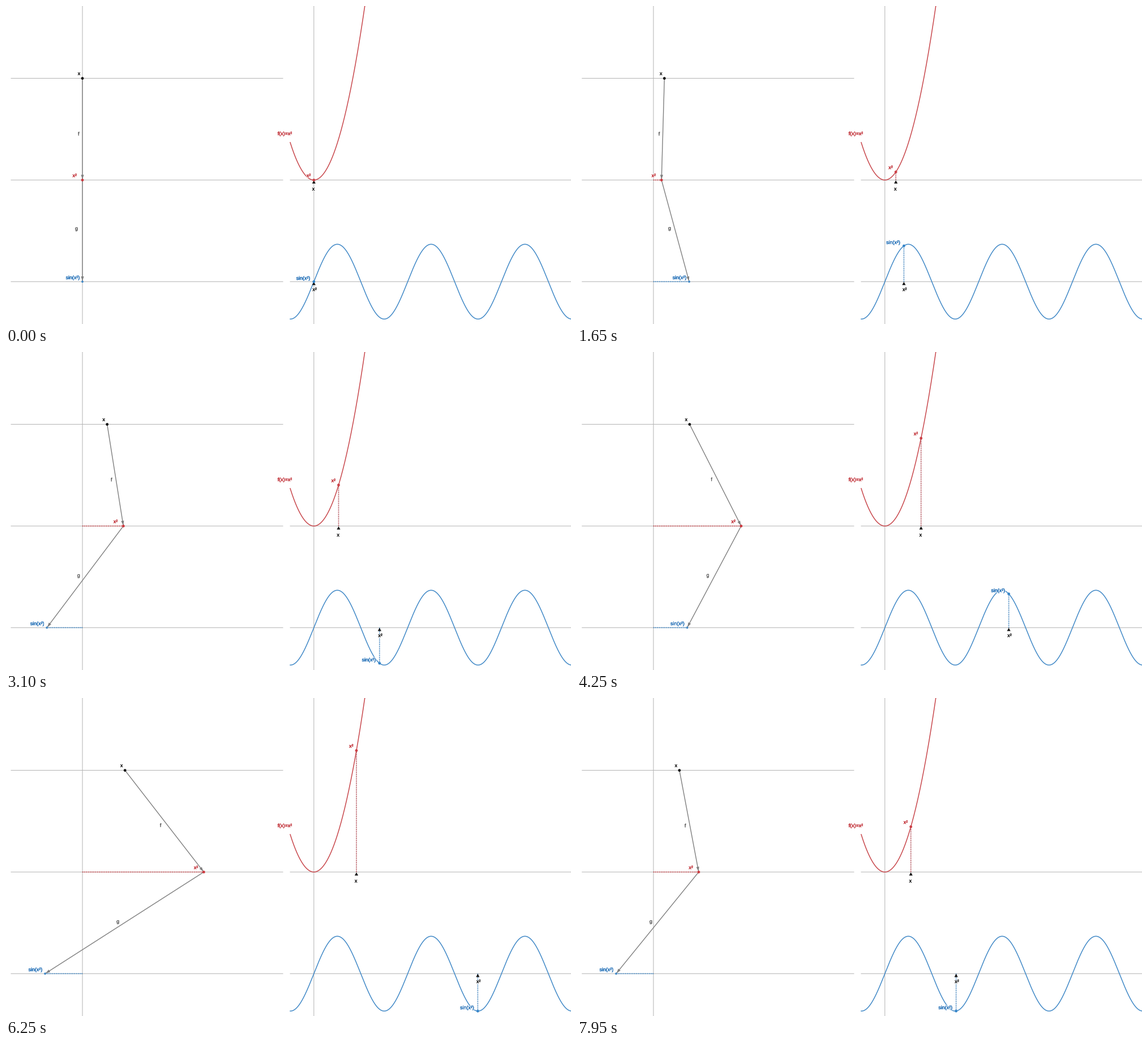
These frames come from a looping animation (998 by 561 pixels, 8000 ms). A matplotlib script:

```python
import numpy as np
import matplotlib.pyplot as plt
from matplotlib.animation import FuncAnimation
from matplotlib.patches import Circle, Polygon
from matplotlib.patheffects import Stroke, withStroke

W, H, DPI = 998, 561, 100
PX = 72 / DPI                 # points per pixel
STEP = 50                     # ms per frame
UNIT, AMP = 26.37, 66         # pixels per unit, height of the sine
LEFT, RIGHT = 135, 543.8      # vertical axes
TOP, MID, LOW = 127.6, 307, 486.3

RED, BLUE, GRAY, BLACK = "#c8474c", "#4189c7", "#808080", "#111111"
RED_TEXT, BLUE_TEXT, GRAY_TEXT = "#bd2028", "#1668b4", "#606060"
AXIS = "#b2b2b2"

plt.rcParams["font.family"] = "Liberation Sans"
fig = plt.figure(figsize=(W / DPI, H / DPI), dpi=DPI, facecolor="white")
ax = fig.add_axes([0, 0, 1, 1])
ax.set_xlim(0, W)
ax.set_ylim(H, 0)
ax.axis("off")


def line(xs, ys, color, width, z=2, **kw):
    return ax.plot(xs, ys, color=color, lw=width * PX, zorder=z,
                   snap=False, **kw)[0]


def dotted(color):
    return line([], [], color, 1.7, 3, ls=(0, (0.95, 0.95)), dash_capstyle="butt")


def dot(color, radius):
    return ax.add_patch(Circle((0, 0), radius, color=color, lw=0, zorder=7))


def label(s, color, x=0, y=0):
    halo = [Stroke(linewidth=2.2 * PX, foreground="white"),
            withStroke(linewidth=0.25 * PX, foreground=color)]
    return ax.text(x, y, s, color=color, fontsize=8.9 * PX, ha="center",
                   va="baseline", zorder=6, path_effects=halo)


def shape(color, z):
    return ax.add_patch(Polygon([(0, 0)] * 3, color=color, lw=0, zorder=z,
                                snap=False))


class Arrow:
    def __init__(self):
        self.shaft = line([], [], GRAY, 1.4, 4)
        self.head = shape(GRAY, 4)

    def place(self, a, b):
        a, b = np.array(a), np.array(b)
        d = (b - a) / np.hypot(*(b - a))
        n = np.array([-d[1], d[0]])
        tip = b - d * 1.2
        base = tip - d * 8
        self.shaft.set_data([a[0], b[0]], [a[1], b[1]])
        self.head.set_xy([tip, base + n * 2.6, base - n * 2.6])


# axes
for y in (TOP, MID, LOW):
    line([9, 489], [y, y], AXIS, 1, 1)
for y in (MID, LOW):
    line([502, W], [y, y], AXIS, 1, 1)
for x in (LEFT, RIGHT):
    line([x, x], [0, H], AXIS, 1, 1)

# function graphs
u = np.linspace((502 - RIGHT) / UNIT, 17.3, 900)
line(RIGHT + UNIT * u, LOW - AMP * np.sin(u), BLUE, 1.5)
p = u[u < 3.6]
line(RIGHT + UNIT * p, MID - UNIT * p ** 2, RED, 1.5)
label("f(x)=x²", RED_TEXT, 492.5, 228)

# moving parts
f_arrow, g_arrow = Arrow(), Arrow()
f_run, f_rise = dotted("#cc4046"), dotted("#a83a44")
g_run, g_rise = dotted("#2f80c6"), dotted("#2f78b8")
x_dot, f_dot, g_dot = dot(BLACK, 2.4), dot("#cc3a40", 2.4), dot(BLUE, 1.9)
f_mark, g_mark = dot("#cc4046", 2.4), dot("#3585c9", 2.4)
x_tri, sq_tri = shape(BLACK, 5), shape(BLACK, 5)
x_name, x_foot = label("x", BLACK), label("x", BLACK)
f_name, g_name = label("f", GRAY_TEXT), label("g", GRAY_TEXT)
sq_name, sq_side = label("x²", RED_TEXT), label("x²", RED_TEXT)
sq_foot = label("x²", BLACK)
sin_name, sin_side = label("sin(x²)", BLUE_TEXT), label("sin(x²)", BLUE_TEXT)

TIMES = [0, 550, 1650, 3100, 4250, 5150, 5575, 6250, 7950]
VALUES = [0, 0, 0.735, 1.656, 2.424, 3.017, 3.292, 2.851, 1.741]


def foot(tri, x, y):
    tri.set_xy([(x, y), (x - 3.1, y + 5.7), (x + 3.1, y + 5.7)])


def update(i):
    x = np.interp(i * STEP, TIMES, VALUES)
    square, arg = x * x, x * x + x
    s = np.sin(arg)

    # mapping diagram
    xa, xf, xg = LEFT + UNIT * x, LEFT + UNIT * square, LEFT + AMP * s
    f_arrow.place((xa, TOP), (xf, MID))
    g_arrow.place((xf, MID), (xg, LOW))
    f_run.set_data([LEFT, xf], [MID, MID])
    g_run.set_data([LEFT, xg], [LOW, LOW])
    x_dot.center = xa, TOP
    f_dot.center = xf, MID
    g_dot.center = xg, LOW
    x_name.set_position((xa - 6, 122))
    sq_name.set_position((xf - 13.8, 302))
    sin_name.set_position((xg - 17, 482))
    f_name.set_position(((xa + xf) / 2 - 6.7, 228.4 - 0.007 * (xf - xa)))
    tilt = np.clip(0.012 * (xf - xg), -0.7, 1.7)
    g_name.set_position(((xf + xg) / 2 - 10.5 - 0.6 * tilt, 395.4 + tilt))

    # graphs
    px, py = RIGHT + UNIT * x, MID - UNIT * square
    qx, qy = RIGHT + UNIT * arg, LOW - AMP * s
    f_rise.set_data([px, px], [MID, py])
    g_rise.set_data([qx, qx], [LOW, qy])
    f_mark.center = px, py
    g_mark.center = qx, qy
    foot(x_tri, px, MID + 0.5)
    foot(sq_tri, qx, LOW + 0.3)
    x_foot.set_position((px - 0.8, 325.5))
    sq_side.set_position((px - 9.2, py - 5))
    sq_foot.set_position((qx + 1.3, 503))
    sin_side.set_position((qx - 18.8, qy - 3.2))
    return []


anim = FuncAnimation(fig, update, frames=160, interval=STEP,
                     init_func=lambda: update(0), repeat=True,
                     repeat_delay=0, blit=False)
plt.show()
```
